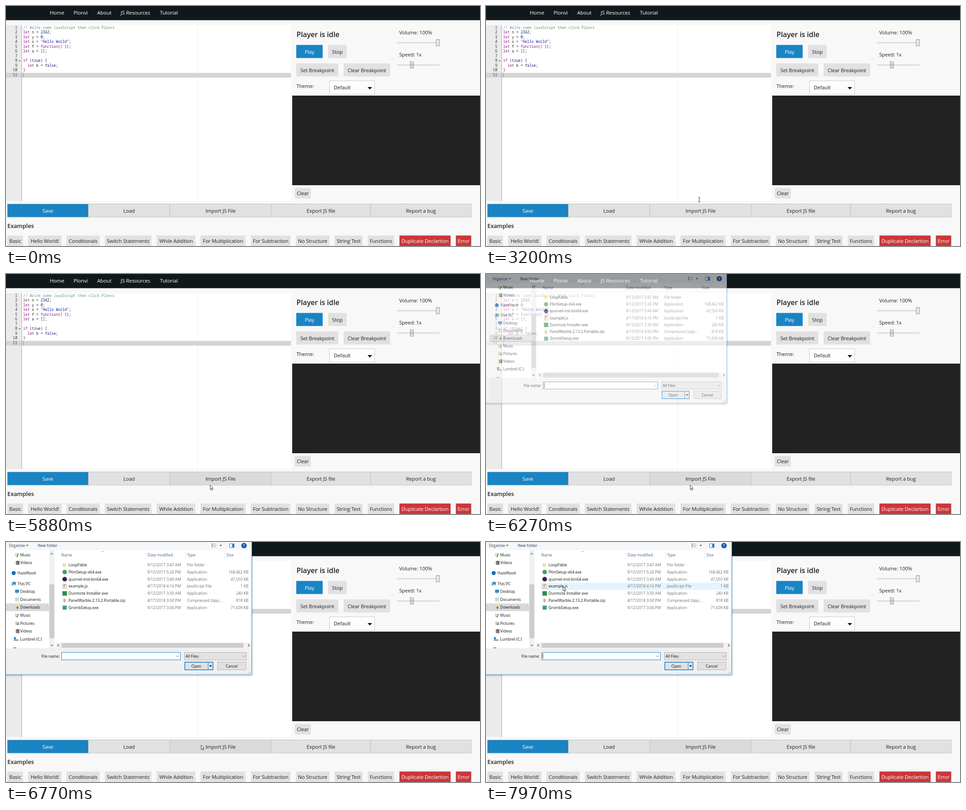
These frames come from a looping animation (1050 px wide and 533 px high, 8000 ms). An HTML page:

```html
<!DOCTYPE html>
<html lang="en">
<head>
<meta charset="utf-8">
<title>Code player</title>
<style>
html, body { margin: 0; width: 100%; height: 100%; overflow: hidden; background: #f8f8f8; }
svg { display: block; width: 1050px; height: 533px; }
text { font: 11.3px "Open Sans", sans-serif; letter-spacing: -.16px; fill: #222; white-space: pre; }
.mid { text-anchor: middle; }
.end { text-anchor: end; }
.light { fill: #fff; }
.nav { font-size: 11.5px; fill: #fff; }
.title { font-size: 15.7px; font-weight: 600; letter-spacing: 0; }
.sub { font-size: 12.8px; font-weight: 600; letter-spacing: 0; }
.code { font: 8.05px "Noto Sans Mono", monospace; letter-spacing: 0; }
.num { fill: #333; }
.key { fill: #930f80; }
.str { fill: #1a1aa6; }
.val { fill: #1a1a70; }
.rem { fill: #5f9272; }
#dialog text { font-size: 8.5px; letter-spacing: 0; fill: #111; }
#dialog .grey { fill: #6d6d6d; }
#dialog .head { fill: #4c607a; }
#dialog .tool { fill: #1e395b; }
#dialog .light { fill: #fff; font-weight: 700; }
#frame { filter: drop-shadow(0 2px 2px rgba(0, 0, 0, .25)); }
</style>
</head>
<body>
<svg id="stage" viewBox="0 0 1050 533" xmlns="http://www.w3.org/2000/svg"></svg>
<script>
const LOOP = 8000;
const BLUE = '#1a84c4', GREY = '#e1e1e1', RED = '#cb373b';

const rect = (x, y, w, h, fill, more = '') =>
  `<rect x="${x}" y="${y}" width="${w}" height="${h}" fill="${fill}" ${more}/>`;
const box = (x, y, w, h, fill, stroke, width = 1) =>
  rect(x, y, w, h, fill, `stroke="${stroke}" stroke-width="${width}"`);
const text = (x, y, str, cls = '') => `<text x="${x}" y="${y}" class="${cls}">${str}</text>`;
const path = (d, fill, stroke = 'none', width = 1) =>
  `<path d="${d}" fill="${fill}" stroke="${stroke}" stroke-width="${width}"/>`;
const disc = (x, y, r, fill) => `<circle cx="${x}" cy="${y}" r="${r}" fill="${fill}"/>`;
const button = (x1, x2, y, h, label, fill = GREY) =>
  rect(x1, y, x2 - x1, h, fill) +
  text((x1 + x2) / 2, y + (h > 25 ? h / 2 + 5 : 16.2), label, fill === GREY ? 'mid' : 'mid light');
const chevron = (x, y) => path(`M${x - 2.5} ${y - 1.3}l2.5 2.6 2.5-2.6`, 'none', '#555', .9);

// Page

const CODE = `// Write some JavaScript then click Plonvi
let n = 2342;
let y = 0;
let x = "Hello World";
let f = function() {};
let a = [];

if (true) {
  let b = false;
}
`.split('\n');

function paint(line) {
  return line.replace(/(\/\/.*)|(".*?")|\b(let|if|function)\b|\b(\d+|true|false)\b/g,
    (word, rem, str, key) => {
      const cls = rem ? 'rem' : str ? 'str' : key ? 'key' : 'val';
      return `<tspan class="${cls}">${word}</tspan>`;
    });
}

function header() {
  const items = [[97, 'Home'], [149.5, 'Plonvi'], [202, 'About'], [254, 'JS Resources'], [341, 'Tutorial']];
  return rect(0, 0, 1050, 31.5, '#11181b') + items.map(([x, s]) => text(x, 18.8, s, 'nav')).join('');
}

function editor() {
  const lines = CODE.map((line, i) => {
    const y = 50.6 + i * 10.53;
    return text(25, y, i + 1, 'code num end') + text(38, y, paint(line), 'code');
  });
  return rect(0, 42.5, 631.5, 390.5, '#fff') +
    rect(0, 42.5, 35, 390.5, '#ebebeb') +
    rect(424, 42.5, 1, 390.5, '#ececec') +
    rect(0, 148.5, 631.5, 10.5, '#d4d4d4') +
    rect(34.3, 42.5, 1, 390.5, '#a4a4a4') +
    rect(38, 149, 1.3, 9.5, '#a2a0ae') +
    path('M28 120.8h4l-2 2.6z', '#555') +
    lines.join('');
}

function slider(x, y, mark) {
  return rect(866, y - 1.5, 94, 3, '#dfdcd6') +
    box(x - 3.5, y - 7, 7, 14, '#e9e9e9', '#8b8b8b') +
    (mark ? path(`M${x - 2} ${y - 2}h4m-4 2h4m-4 2h4`, 'none', '#777', .8) : '');
}

function controls() {
  return text(643.5, 69, 'Player is idle', 'title') +
    button(643, 701.5, 86.5, 29, 'Play', BLUE) +
    button(713.5, 754.5, 86.5, 29, 'Stop') +
    button(643, 736, 127.5, 29, 'Set Breakpoint') +
    button(748, 851, 127.5, 29, 'Clear Breakpoint') +
    text(871, 62.5, 'Volume: 100%') + slider(956.5, 81.5) +
    text(871, 112, 'Speed: 1x') + slider(899, 131, true) +
    text(643.5, 182, 'Theme:') +
    box(716.5, 166, 100, 30, '#fdfdfd', '#c9c9c9') +
    text(726, 185.3, 'Default') +
    path('M801 180h10l-5 5.5z', '#111') +
    rect(634, 199, 416, 199, '#222') +
    button(640, 675, 404, 23.5, 'Clear');
}

const BAR = [[3, 182.5, 'Save'], [182.5, 363, 'Load'], [363, 587.5, 'Import JS File'],
  [587.5, 808, 'Export JS file'], [808, 1030.5, 'Report a bug']];

function bar() {
  return BAR.map(([a, b, label], i) =>
    `<rect class="tab" x="${a}" y="439.5" width="${b - a}" height="29.5" stroke="#c2c2c2" stroke-width=".9"/>` +
    text((a + b) / 2, 458.8, label, i ? 'mid' : 'mid light')).join('');
}

function examples() {
  const items = [[3, 38, 'Basic'], [49, 123, 'Hello World!'], [134, 207.5, 'Conditionals'],
    [219, 322, 'Switch Statements'], [334, 419.5, 'While Addition'], [431, 530.5, 'For Multiplication'],
    [542.5, 630, 'For Subtraction'], [642, 716.5, 'No Structure'], [728, 790, 'String Test'],
    [801.5, 860, 'Functions'], [871.5, 985, 'Duplicate Declartion'], [996.5, 1030.5, 'Error']];
  return text(3, 492.5, 'Examples', 'sub') +
    items.map(([a, b, s], i) => button(a, b, 509.7, 24, s, i > 9 ? RED : GREY)).join('');
}

// File dialog

const folder = (x, y) => path(`M${x} ${y - 4}h3l1 1h3v7h-7z`, '#f8d475') + rect(x + 1, y - 2, 6, 6, '#fbe08f');
const icons = {
  music: y => folder(20, y) + path(`M26 ${y + 3}v-5l3 1`, 'none', '#1f7fd0', 1.2) + disc(25, y + 3, 1.5, '#1f7fd0'),
  film: y => folder(20, y) + rect(23, y - 4, 6.5, 8.5, '#4b4654') + rect(24.7, y - 2.5, 3, 2.2, '#b9a7c9') +
    rect(24.7, y + 1, 3, 2.2, '#d6b877'),
  cloud: y => disc(17, y, 4.5, '#0f6cc4'),
  pc: y => rect(14, y - 4, 8, 6, '#2f9be0') + rect(12.5, y - 1, 3, 5, '#8a98a5') + rect(16, y + 3, 6, 1, '#8a98a5'),
  desk: y => rect(20, y - 4, 9, 6.5, '#2490dc') + rect(22.5, y + 3.3, 4, 1, '#6c8fae'),
  page: y => folder(20, y) + box(23, y - 3.5, 5.5, 7.5, '#fff', '#88a2bb', .7) +
    path(`M24 ${y - 1}h3.5m-3.5 2h3.5`, 'none', '#4c8fcd', .7),
  down: y => folder(20, y) + path(`M24 ${y - 2}h2.5v2.5h2l-3.2 3.5-3.3-3.5h2z`, '#1f7fd0'),
  image: y => folder(20, y) + rect(23, y - 2.5, 6.5, 6, '#8ec9ee') + path(`M23 ${y + 3.5}l3-3 3.5 3z`, '#4d9a66'),
  disk: y => rect(17.5, y + 1, 10, 3, '#8b949c') + rect(17.5, y - 4, 4.5, 4.5, '#1f8ad6')
};

const PLACES = [['music', 28.5, 'Music'], ['film', 46, 'Videos'], ['cloud', 69, 'HazeNook'], ['pc', 92.5, 'This PC'],
  ['desk', 110, 'Desktop'], ['page', 127.5, 'Documents'], ['down', 145, 'Downloads'], ['music', 162.7, 'Music'],
  ['image', 180.3, 'Pictures'], ['film', 197.8, 'Videos'], ['disk', 215.3, 'Lumbrel (C:)']];

const ROW = 15.8, LIST = 43.1;
const FILES = [
  ['LoopFable', '9/12/2017 3:47 AM', 'File folder', '', y => folder(126, y)],
  ['PlimSetup-x64.exe', '9/12/2017 5:26 PM', 'Application', '168,462 KB', y => disc(130, y, 5, '#3f9f6c')],
  ['quorvel-inst-bin64.exe', '9/12/2017 3:40 AM', 'Application', '47,550 KB', y => disc(130, y, 5, '#2c2255')],
  ['example.js', '4/17/2018 4:16 PM', 'JavaScript File', '1 KB', y =>
    box(126, y - 4.5, 8, 9, '#fffdf3', '#9a8a66', .8) + path(`M128 ${y + 2}q4-1 1-3t3-2`, 'none', '#c8763a', 1.3)],
  ['Dunmote Installer.exe', '9/12/2017 3:30 AM', 'Application', '240 KB', y => rect(125, y - 5, 10, 10, '#2f8f55')],
  ['PanelWarble.2.13.2.Portable.zip', '4/17/2018 3:50 PM', 'Compressed (zipp...', '818 KB', y =>
    folder(126, y) + path(`M130 ${y - 4}v8`, 'none', '#777', 1.2)],
  ['GrombSetup.exe', '9/12/2017 3:06 PM', 'Application', '71,609 KB', y => rect(125.5, y - 4.5, 9, 9, '#3a9b8f')]
];

function places() {
  return rect(0, 136.5, 95.5, 17, '#d9d9d9') + PLACES.map(([kind, y, label]) => {
    const x = kind === 'cloud' || kind === 'pc' ? 25.5 : 31.5;
    return icons[kind](y) + text(x, y + 3.2, label);
  }).join('') +
    rect(16, 234, 7, 2, '#5ba4d6') +
    rect(96, 18, 11.5, 218, '#f0f0f0') + rect(96, 94, 11, 119.5, '#cdcdcd') +
    path('M98.8 27.5l2.6-2.8 2.6 2.8M98.8 228l2.6 2.8 2.6-2.8', 'none', '#444', 1.1);
}

function files() {
  const heads = [[122.5, 'Name'], [313.5, 'Date modified'], [401, 'Type'], [488.5, 'Size']];
  return heads.map(([x, s]) => text(x, 32, s, 'head')).join('') +
    [309, 397, 484.5].map(x => rect(x, 19, 1, 19, '#e3e3e3')).join('') +
    path('M211 22.3l2.5-2.2 2.5 2.2', 'none', '#777', .8) +
    `<rect id="row" x="121" width="419" height="${ROW}" fill="#e5f3ff"/>` +
    FILES.map(([name, date, type, size, icon], i) => {
      const y = LIST + ROW * (i + .5), base = y + 3;
      return icon(y) + text(138.5, base, name) + text(313, base, date, 'grey') +
        text(401, base, type, 'grey') + text(537, base, size, 'grey end');
    }).join('') +
    rect(110, 224, 434, 11.5, '#f0f0f0') + rect(123, 224, 403, 11, '#cdcdcd') +
    path('M117.3 226.8l-2.7 2.7 2.7 2.7M536.5 226.8l2.7 2.7-2.7 2.7', 'none', '#444', 1.1);
}

function toolbar() {
  return rect(0, 0, 544, 18, '#f5f6f7') +
    text(6.5, 11.2, 'Organize', 'tool') + path('M44.5 6.5h5l-2.5 2.8z', '#1e395b') +
    text(70.5, 11.2, 'New folder', 'tool') +
    path('M455.5 4.5h3m-3 3h3m-3 3h3', 'none', '#5c7089', 1.6) +
    path('M460 4.5h6m-6 3h6m-6 3h6', 'none', '#9aa3ad', .9) +
    path('M473.5 6.5h5l-2.5 2.8z', '#333') +
    box(495.5, 4, 10, 8, '#fff', '#3c7fb8') + rect(501, 4, 4.5, 8, '#2a82cc') +
    disc(527.3, 8, 6, '#0a57a4') + text(527.3, 11.2, '?', 'mid light');
}

function footer() {
  return rect(0, 236, 544, 58, '#f0f0f0') +
    text(119, 256.6, 'File name:', 'end') +
    box(123.2, 245.3, 263, 16.5, '#fff', '#1a7fd4') + chevron(380, 253.7) +
    rect(125.3, 247.3, 1, 12.2, '#000', 'id="caret"') +
    box(395.5, 245.3, 137, 16.5, '#e3e3e3', '#b0b0b0') + text(397.5, 256.6, 'All Files') + chevron(526.5, 253.7) +
    box(396.2, 266.8, 62.3, 17, GREY, '#0f7ad4', 1.5) + rect(447.3, 267, 1, 17, '#0f7ad4') +
    path('M450.2 274h6l-3 3.4z', '#111') + text(421.5, 278.6, 'Open', 'mid') +
    box(468.8, 266.8, 63, 17, GREY, '#b0b0b0') + text(500, 278.6, 'Cancel', 'mid') +
    [[541, 287], [538.5, 289.5], [541, 289.5], [536, 292], [538.5, 292], [541, 292]]
      .map(([x, y]) => rect(x - .7, y - .7, 1.4, 1.4, '#b0b0b0')).join('');
}

const dialog = () => '<g id="dialog">' +
  rect(-120, -120, 665, 414.7, '#2a86d2', 'id="frame"') +
  rect(-119, -119, 663, 412.7, '#f5f6f7') + rect(-119, 18, 663, 218, '#fff') +
  toolbar() + places() + files() + footer() + '</g>';

// Pointer shapes, drawn around their hot spot
const POINTERS = {
  arrow: path('M0 0V9.8L2.2 7.7L3.9 11.4L5.4 10.7L3.8 7.2H6.8Z', '#fff', '#111', .8),
  beam: path('M-2-5H2M0-5V5M-2 5H2', 'none', '#222', .9),
  hand: path('M-1 9V1Q0-.6 1 1V5Q2.2 4.2 3 5.4Q4.2 4.8 5 6Q6.8 5.6 6.8 7.5V10L5.5 13.7H-.5L-3.8 9.3Q-3.6 7.6-2.2 8Z',
    '#fff', '#111', .8)
};

const $ = id => document.getElementById(id);
$('stage').innerHTML = rect(0, 0, 1050, 533, '#f8f8f8') + header() + editor() + controls() + bar() + examples() +
  dialog() + '<g id="pointer">' +
  Object.entries(POINTERS).map(([k, d]) => `<g id="${k}">${d}</g>`).join('') + '</g>';
const tabs = [...document.querySelectorAll('.tab')];

// Motion: time, x, y of the pointer
const TRACK = [[700, 972, 532], [1070, 493, 273], [1270, 493, 273], [1500, 380, 200], [1690, 150, 173],
  [1850, 78, 212], [1960, 105, 285], [2060, 181, 347], [2380, 531, 489], [2530, 531, 489],
  [2750, 515, 452], [2980, 482, 421], [3200, 472, 430], [3300, 474, 431], [3600, 487, 400],
  [3850, 507, 425], [4000, 498, 444], [4140, 485, 447], [4400, 478, 445], [4690, 466, 473],
  [5170, 466, 473], [5460, 452, 469], [6740, 452, 469], [6770, 432, 451], [7000, 300, 290],
  [7300, 205, 160], [7550, 178, 126], [7960, 170, 99], [8000, 170, 99]];

const still = (a, b) => !a || !b || (a[1] === b[1] && a[2] === b[2]);

function slope(i, k) {
  const a = TRACK[i - 1], p = TRACK[i], b = TRACK[i + 1];
  return still(a, p) || still(p, b) ? 0 : (b[k] - a[k]) / (b[0] - a[0]);
}

function place(t) {
  let i = 0;
  while (i < TRACK.length - 2 && t >= TRACK[i + 1][0]) i++;
  const a = TRACK[i], b = TRACK[i + 1], d = b[0] - a[0];
  const u = Math.max(0, Math.min(1, (t - a[0]) / d)), v = 1 - u;
  return [1, 2].map(k => Math.round(
    a[k] * (1 + 2 * u) * v * v + slope(i, k) * d * u * v * v +
    b[k] * u * u * (3 - 2 * u) - slope(i + 1, k) * d * u * u * v));
}

const show = (el, on) => el.setAttribute('visibility', on ? 'inherit' : 'hidden');

function shape(t, x, y) {
  if (t >= 5880) return y > 245 && y < 262 && x < 386 ? 'beam' : 'arrow';
  if (x > 35 && x < 631 && y > 42 && y < 434) return 'beam';
  return x > 3 && x < 1031 && y >= 439 && y < 470 ? 'hand' : 'arrow';
}

function draw(t) {
  const [x, y] = place(t), kind = shape(t, x, y);
  show($('pointer'), t >= 710);
  $('pointer').setAttribute('transform', `translate(${x + .3} ${y})`);
  Object.keys(POINTERS).forEach(k => show($(k), k === kind));

  tabs.forEach((tab, i) => {
    const over = t >= 5880 ? i === 2 : t >= 710 && kind === 'hand' && x >= BAR[i][0] && x < BAR[i][1];
    tab.setAttribute('fill', i ? (over ? '#dadada' : GREY) : (over ? '#1779b3' : BLUE));
  });

  const open = Math.max(0, Math.min(1, (t - 6210) / 230));
  const rest = (1 - open) ** 3, scale = 1 - .085 * rest;
  show($('dialog'), open > 0);
  $('dialog').setAttribute('opacity', 1 - rest);
  $('dialog').setAttribute('transform', `translate(222 80) scale(${scale}) translate(-222 -80)`);
  show($('caret'), open > 0 && (t < 6765 || t >= 7300));

  const row = Math.floor((y - LIST) / ROW);
  const over = t >= 6440 && row >= 0 && row < FILES.length && x > 121 && x < 540;
  show($('row'), over);
  if (over) $('row').setAttribute('y', LIST + row * ROW);
}

let start;
function tick(now) {
  start ??= now;
  draw((now - start) % LOOP);
  requestAnimationFrame(tick);
}
draw(0);
requestAnimationFrame(tick);
</script>
</body>
</html>
```
